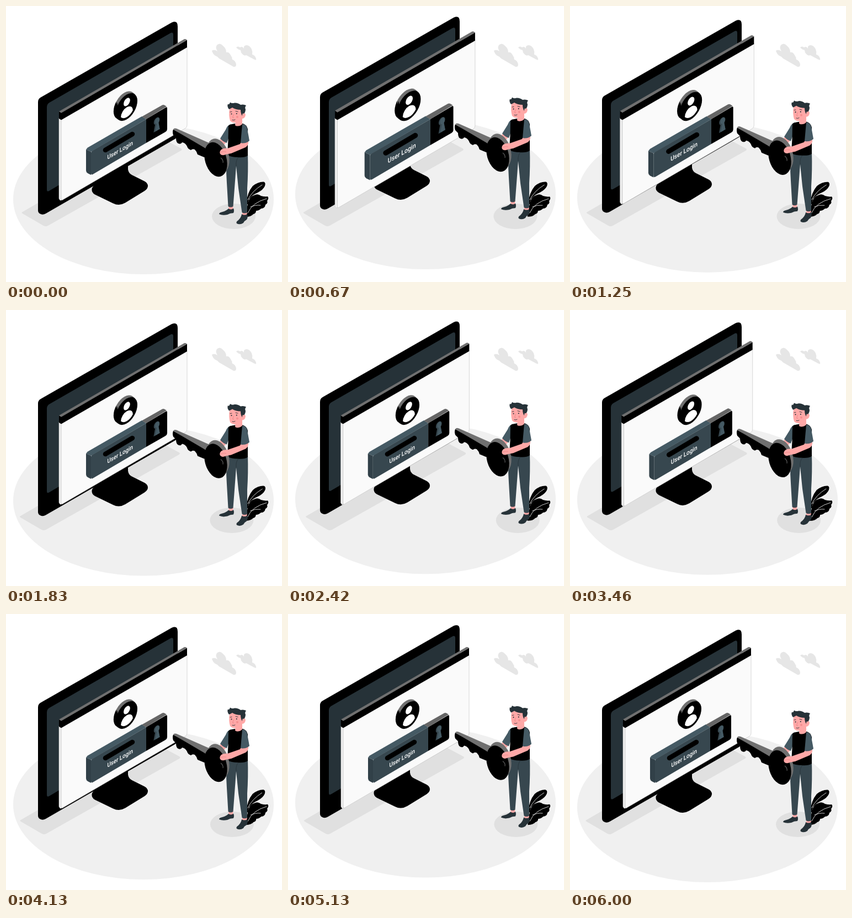
These frames come from a looping animation (500 px wide and 500 px high, 6040 ms). An HTML page:

```html
<!DOCTYPE html>
<html lang="en">
<head>
<meta charset="utf-8">
<title>User Login</title>
<style>
html, body { margin: 0; width: 100%; height: 100%; overflow: hidden; background: #fff; }
svg { display: block; width: 100vw; height: 100vh; }
.ink { fill: #000; }
.slate { fill: #37474f; }
.steel { fill: #455a64; }
.dark { fill: #263238; }
.skin { fill: #ffa8a7; }
.edge { fill: #707070; }
.shade { fill: #e0e0e0; }
.cloud { fill: #e6e6e6; }
.vein { fill: none; stroke: #fff; stroke-width: .8; stroke-linecap: round; }
text { font: 500 11.2px Roboto, "Open Sans", sans-serif; fill: #fff; }
</style>
</head>
<body>
<svg viewBox="0 0 500 500">
  <defs>
    <linearGradient id="rim">
      <stop offset=".12" stop-color="#000"/>
      <stop offset=".12" stop-color="#707070"/>
    </linearGradient>
  </defs>

  <g class="float"><ellipse cx="249" cy="350" rx="236" ry="136" fill="#f0f0f0"/></g>

  <g id="shadows" class="shade">
    <path d="M30 373 268 235Q271 233 274 235L317 258Q320 260 317 262L76 398Q72 400 68 398L30 376Q27 374.500 30 373Z"/>
    <ellipse cx="412.500" cy="381" rx="39.500" ry="23"/>
  </g>

  <!-- monitor -->
  <g class="float">
    <path class="ink" d="M183 280H221V296Q222 303 228 306L251 317.500Q257 321 257 326 257 331 251 335L216 356.500Q205 363 194 357.500L161 341.500Q155 338 155.500 332 156 327 162 323L183 311Z"/>
    <path class="ink" d="M58 174Q58 168 63 165.500L300 30Q311 25 311 37V233Q311 238 306 241L72 376Q66 379.500 61 376 58 374 58 370Z"/>
    <path class="dark" d="M74 183Q74 177.500 79 174.700L298 49Q303 46.500 303 52V199Q303 203 299 205L78 335Q74 337 74 333Z"/>
  </g>

  <!-- login window -->
  <g id="panel">
    <path d="M96 203 100 205.500V352L98 352 96 349Z" fill="#f1f1f1" stroke="#c8c8c8" stroke-width=".6"/>
    <path d="M100 205 328 74V216Q328 219.500 325 221.500L102 351.500Q100 352.500 100 350Z" fill="#fafafa" stroke="#c8c8c8" stroke-width=".7"/>
    <path class="ink" d="M96 191 100 193.500 328 61.500V75L100 206.500 96 204Z"/>
    <path class="edge" d="M96 191 323 60Q325 59 328 61.500L100 193.800Z"/>

    <circle r="22.700" fill="url(#rim)" transform="matrix(.866 -.5 0 1 214.500 179.800)"/>
    <circle r="22.700" fill="url(#rim)" transform="matrix(.866 -.5 0 1 216.500 181.400)"/>
    <g transform="matrix(.866 -.5 0 1 218.500 183)">
      <circle class="ink" r="22.500"/>
      <circle cx="0.500" cy="-8.800" r="6.800" fill="#fff"/>
      <path d="M-12 12.500a12.500 12 0 0 1 25 0q-5 6-12.500 6t-12.500-6Z" fill="#fff"/>
    </g>

    <path class="steel" d="M145 260 148 256.500 246 200 254 205 154 264Z"/>
    <path d="M145 260 154 264V306L148 303Q145 301 145 298Z" fill="#314048"/>
    <path class="slate" d="M154 266Q154 264 156 262.500L254 205V248L158 304.500Q154 307 154 303Z"/>
    <path d="M246 200.500 283 179.500Q285 178.500 287 179.500L291 182 254 205Z" fill="#666"/>
    <path class="ink" d="M254 205 289 184Q292 182 292 185V223Q292 226 289 228L254 248Z"/>
    <g transform="matrix(.866 -.5 0 1 273 208.500)">
      <path class="slate" d="M-3.500 5A6.200 6.200 0 1 1 3.500 5L6.500 17.500H-6.500Z"/>
      <path class="steel" d="M0 5A5.500 5.500 0 0 1 1-5.500 6 6 0 0 1 4 4.500L6.500 17.500H-3Z"/>
    </g>
    <path d="M180 261 229 232" stroke="#000" stroke-width="8.500" stroke-linecap="round"/>
    <text transform="matrix(.866 -.5 0 1 183.500 278.300)">User Login</text>
  </g>

  <g class="cloud">
    <path d="M373 81Q377 78 383 82 378 74 383 70 388 66 393 72 399 77 399 84 404 83 407 89 410 93 410 97 416 99 417 106 417 111 412 110L386 95Q383 91 379 90 374 86 373 81Z"/>
    <path d="M417 75Q420 72 424 75 428 72 431 77 430 71 436 71 441 71 445 78 447 83 446 88 451 89 453 95 454 99 450 97L435 89Q432 91 428 87 425 84 425 80 420 79 417 75Z"/>
  </g>

  <g id="plant">
    <path class="ink" d="M435 358Q437 338 447 326 457 318 467 318.500 471 320 469 326 466 333 456 338 446 342 440 350L439 360Z"/>
    <path class="ink" d="M434 382Q436 364 439 356 441 345 449 343 456 339 462 344 469 346 474 345 477 348 473 353 475 357 470 360 469 367 462 367 458 371 453 371 453 376 448 377 444 382 434 382Z"/>
    <path class="vein" d="M438 351Q446 335 464 324M438 375Q446 356 472 349M443 364Q451 360 461 361"/>
  </g>

  <!-- man with key -->
  <g class="float">
    <path class="skin" d="M351 248Q355 245 360 247L368 251 360 257ZM391 237 402 243 391 256 382 252Z"/>

    <path class="skin" d="M403 362H411.500L411 370H404ZM428 372H437L436 381H428Z"/>
    <path class="dark" d="M403 367Q408 370 412 366.500 414 371 412 375 406 375 401 378 392 380 386 377 386 374 392 373 399 371 403 367Z"/>
    <path class="dark" d="M427 377Q432 380 437 377 439 382 436 387 432 389 430 393 424 397 418 394 416 391 421 388 426 383 427 377Z"/>
    <path class="slate" d="M400 266 438 268Q439 300 437 330L437 374Q432 377 427.500 374L421 330 417 290 414 330 411.500 363Q407 366 402.500 363L400 320Q398 290 400 266Z"/>
    <path d="M417 290Q416 279 421 274" fill="none" stroke="#263238" stroke-width=".8"/>

    <path class="steel" d="M407 214Q401 216 398 224L388 240Q393 246 400 248L406 232Z"/>
    <path class="ink" d="M403 217Q405 214 415 213L429 213Q436 215 438 223L438 271Q432 275 420 274 408 274 401 270 403 243 403 217Z"/>
    <path class="skin" d="M416 204H428V214Q423 219 416 217Q414 215 416 212Z"/>

    <path class="skin" d="M405 186Q415 180 427 187L428 194Q433 192 434 197 433 204 428 204 425 210 419 211 411 213 406 208 403 198 405 186Z"/>
    <path class="dark" d="M404 187Q400 182 402 177.500 404 180 406 174.500 409 177 414 175.500 420 175 425 179 429 178 432 179L435 180Q432 184 434 187 434 192 431 195 428 193 428 199 425 195 425 188 416 188 410 184 407 186 404 187Z"/>
    <g class="dark">
      <circle cx="408.500" cy="195.500" r="1.100"/><circle cx="417.800" cy="195" r="1.100"/>
    </g>
    <path d="M406 192 409 191.500M416 190.500 420 191.500M410 206.500Q413 207.500 415 206" fill="none" stroke="#263238" stroke-width=".9" stroke-linecap="round"/>
    <path d="M412.500 196 410.500 202 413 202.500" fill="none" stroke="#e87f83" stroke-width=".8"/>
    <circle cx="419" cy="201" r="2" fill="#f58f90"/>

    <path class="edge" d="M303 223Q305 220.500 309 222L370 249 366 264Z"/>
    <path class="ink" d="M303 223.500 360 257 375 272 359 274 347 269Q346 264 342 260 338 258 335 261 329 259 328 254 325 248 319 247 317 251 312 249 308 247 308 239L303 234Q301 228 303 223.500Z"/>
    <g transform="translate(380 278)">
      <ellipse class="edge" rx="19.500" ry="32" transform="translate(4 -6.500) rotate(-16)"/>
      <ellipse class="edge" rx="19.500" ry="32" transform="translate(2 -3) rotate(-16)"/>
      <ellipse class="ink" rx="19.500" ry="32" transform="rotate(-16)"/>
      <path d="M9-3Q14 1 13 6" fill="none" stroke="#555" stroke-width="1.300"/>
    </g>

    <path class="skin" d="M426 246 439 244Q440 252 434 256L408 267Q402 268 398 269 391 272 388 268 386 264 390 260 395 257 401 258L424 250Z"/>
    <path d="M389 265Q394 263 399 264" fill="none" stroke="#e87f83" stroke-width=".7"/>
    <path class="steel" d="M428 214Q435 214 437 222L441 244Q434 250 425 248Z"/>
  </g>
</svg>

<script>
const LOOP = 6040, CYCLE = 6000;
const $ = s => document.querySelector(s);
const floaters = document.querySelectorAll('.float');
const shadows = $('#shadows'), panel = $('#panel'), plant = $('#plant');

// [percent, value] pairs, linear in between
const SHAKE = [[0, 0], [10, -1], [20, 2], [30, -4], [40, 4], [50, -4], [60, 4], [70, -4], [80, 2], [90, -1], [100, 0]];
const BEAT = [[0, 1], [10, 1.1], [30, 1], [40, 1], [50, 1.1], [60, 1], [100, 1]];
const WIND = [[0, 0], [25, 1], [75, -1], [100, 0]];

function at(keys, p) {
  const i = keys.findIndex(k => k[0] > p);
  const [a, u] = keys[i - 1], [b, v] = keys[i];
  return u + (v - u) * (p - a) / (b - a);
}

function draw(now) {
  const t = now % LOOP % CYCLE, p = t / CYCLE * 100;
  const rise = 10 * (1 - Math.abs(1 - t % 1500 / 750));
  floaters.forEach(g => g.setAttribute('transform', `translate(0 ${-rise})`));
  shadows.setAttribute('transform', `translate(${at(SHAKE, p)} 0)`);
  panel.setAttribute('transform', `translate(212 206) scale(${at(BEAT, p)}) translate(-212 -206)`);
  plant.setAttribute('transform', `rotate(${at(WIND, p)} 455 350)`);
}

let start;
function tick(now) {
  start ??= now;
  draw(Math.max(0, now - start));
  requestAnimationFrame(tick);
}
draw(0);
requestAnimationFrame(tick);
</script>
</body>
</html>
```
